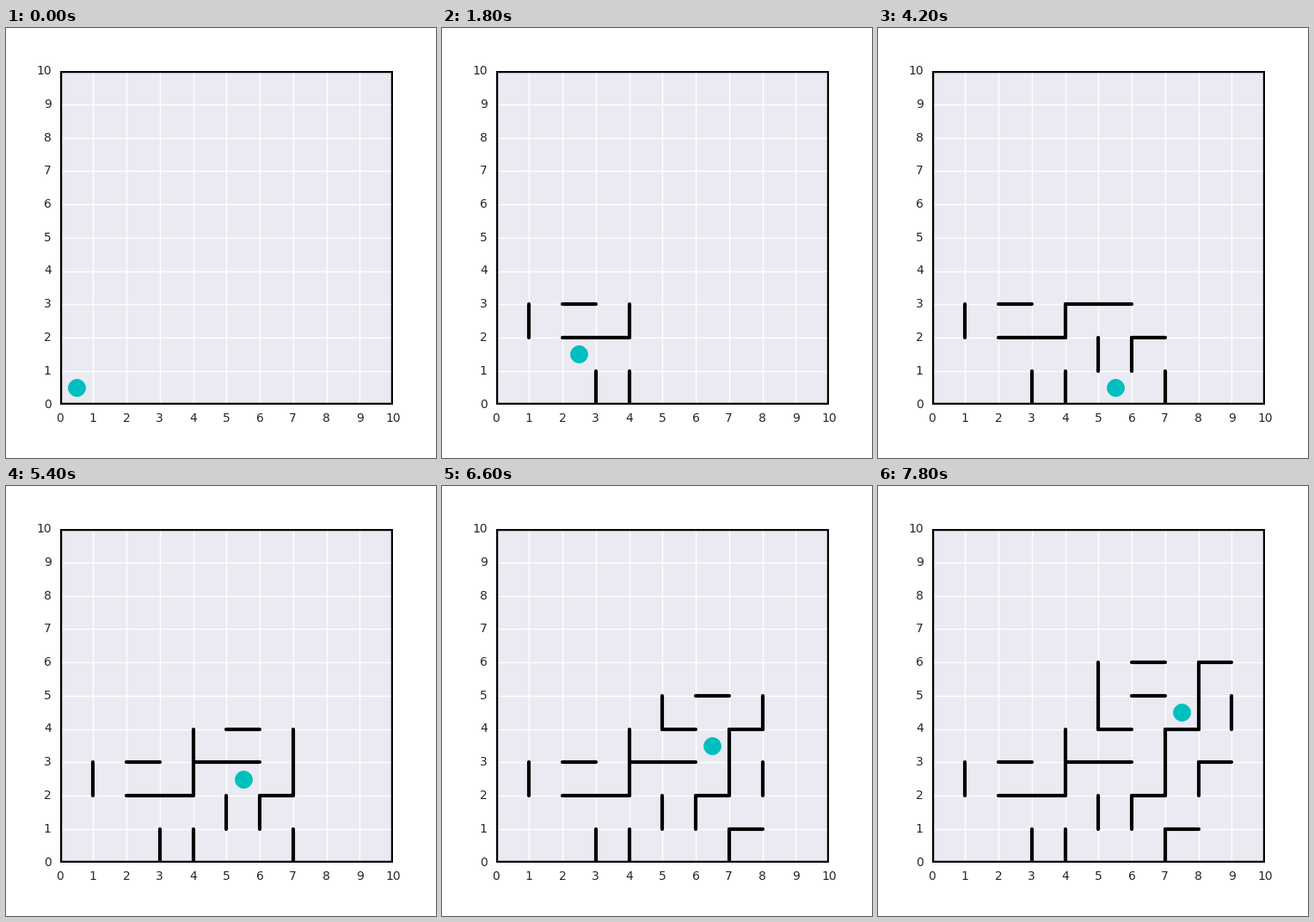
Write a matplotlib script that moves like this. It is 500 px wide and 500 px high and loops after 8 s.

```python
import math

import matplotlib.pyplot as plt
from matplotlib.animation import FuncAnimation
from matplotlib.patches import Circle
from matplotlib.transforms import IdentityTransform

SIZE = 500
MARGIN, SPAN = 62.5, 387.5   # plot area in pixels
N = 10
CELL = SPAN / N
TICKS_PER_MOVE = 3

STEPS = {"R": (1, 0), "L": (-1, 0), "U": (0, 1), "D": (0, -1)}

plt.rcParams.update({
    "font.family": "DejaVu Sans",
    "font.size": 10,
    "ytick.alignment": "center",
    "lines.solid_capstyle": "round",
})


def walk(x, y, moves):
    """Points visited by unit steps from a start."""
    points = [(x, y)]
    for move in moves:
        dx, dy = STEPS[move]
        x, y = x + dx, y + dy
        points.append((x, y))
    return points


PATH = walk(0, 0, "RRURRDRUURUUR")

# Each wall: where it starts and how it runs along the grid
WALLS = [
    walk(1, 2, "U"), walk(3, 0, "U"), walk(4, 0, "U"),
    walk(2, 2, "RRUU"), walk(2, 3, "R"), walk(4, 3, "RR"),
    walk(5, 1, "U"), walk(6, 1, "URUURUUR"), walk(7, 0, "UR"),
    walk(5, 6, "DDR"), walk(6, 5, "R"), walk(6, 6, "R"),
    walk(8, 2, "UR"), walk(9, 4, "U"),
]


def first_seen(a, b):
    """First step at which a unit wall borders a cell next to the ball."""
    mx, my = (a[0] + b[0]) / 2, (a[1] + b[1]) / 2
    for step, (x, y) in enumerate(PATH):
        dx, dy = abs(mx - x - 0.5), abs(my - y - 0.5)
        if max(dx, dy) <= 1.5 and min(dx, dy) <= 1:
            return step
    return len(PATH)


def ball_center(col, row):
    """Whole-pixel position of a cell's middle."""
    x = math.floor(MARGIN + CELL * (col + 0.5) + 0.5)
    y = math.floor(SIZE - MARGIN - CELL * (row + 0.5) + 0.5)
    return x, SIZE - y


fig = plt.figure(figsize=(5, 5), dpi=100, facecolor="white")
ax = fig.add_axes([MARGIN / SIZE, MARGIN / SIZE, SPAN / SIZE, SPAN / SIZE],
                  facecolor="#EAEAF2")
ax.set_axisbelow(True)
ax.grid(True, color="white", linewidth=1, linestyle="-")
ax.tick_params(length=0, pad=7, labelcolor="0.15")
for spine in ax.spines.values():
    spine.set_visible(False)


def draw_wall(a, b, width=3):
    return ax.plot(*zip(a, b), color="black", linewidth=width)[0]


for edge in (0, N):
    draw_wall((edge, 0), (edge, N), 3.2)
    draw_wall((0, edge), (N, edge), 3.2)

segments = [(first_seen(a, b), draw_wall(a, b))
            for wall in WALLS for a, b in zip(wall, wall[1:])]

ball = Circle(ball_center(*PATH[0]), 7.5 * 100 / 72, color="#00BFBF",
              linewidth=0.5, snap=True, transform=IdentityTransform(),
              zorder=3)
ax.add_patch(ball)

ax.set_xlim(0, N)
ax.set_ylim(0, N)
ax.set_xticks(range(N + 1))
ax.set_yticks(range(N + 1))


def update(i):
    step = i // TICKS_PER_MOVE
    ball.center = ball_center(*PATH[step])
    for seen, line in segments:
        line.set_visible(seen <= step)
    return []


anim = FuncAnimation(fig, update, frames=40, interval=200,
                     init_func=lambda: update(0), repeat=True,
                     repeat_delay=0)
plt.show()
```
